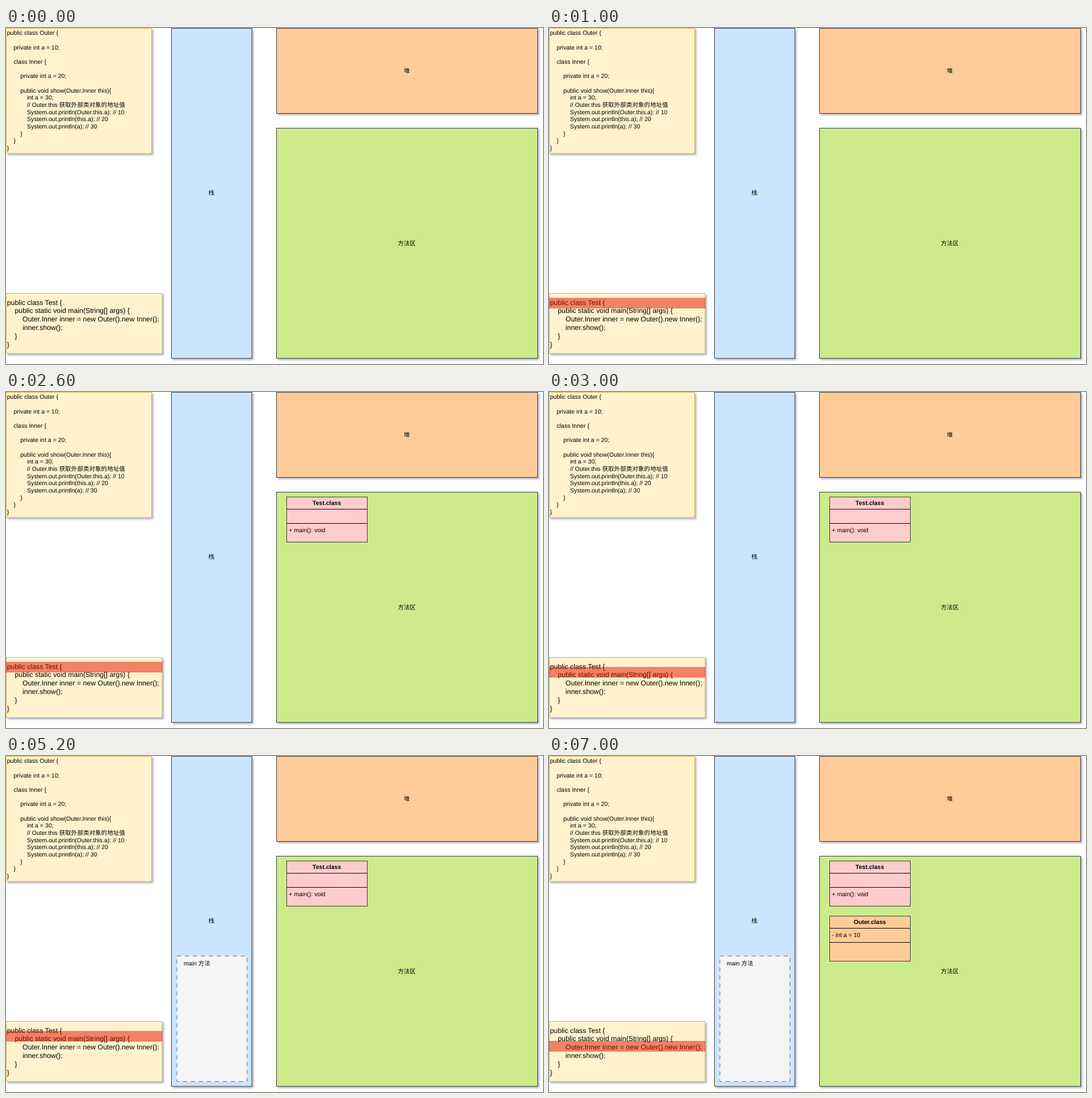
Recreate the animation shown at these times as an HTML page. Size 946 by 592 pixels, loop 8000 ms.

```html
<!DOCTYPE html>
<html lang="zh-CN">
<head>
<meta charset="utf-8">
<style>
  html, body { margin: 0; width: 100%; height: 100%; overflow: hidden; background: #fff; }
  svg { display: block; }
  text {
    font: 10.56px "Liberation Sans", Arial, "Noto Sans CJK SC", sans-serif;
    white-space: pre;
    text-rendering: geometricPrecision;
  }
  .code { font-size: 12.32px; }
  .mid { text-anchor: middle; }
  .bold { font-weight: bold; }
  .box { stroke: #36393d; }
  .note { fill: #fff2cc; stroke: #d6b656; }
  .rule { stroke: #000; }
</style>
</head>
<body>
<svg width="946" height="592" viewBox="0 0 946 592">
  <filter id="shadow" filterUnits="userSpaceOnUse" x="0" y="0" width="946" height="592">
    <feDropShadow dx="2.6" dy="2.6" stdDeviation="1.5" flood-color="#3d4574" flood-opacity=".4"/>
  </filter>
  <g filter="url(#shadow)">
    <rect class="note" x=".5" y=".5" width="256" height="220.5"/>
    <rect class="note" x=".5" y="467.5" width="274.5" height="106"/>
    <rect class="box" x="291.5" y=".5" width="141.5" height="581.5" fill="#cce5ff"/>
    <rect class="box" x="476.5" y=".5" width="460" height="150" fill="#ffcc99"/>
    <rect class="box" x="476.5" y="176.5" width="460" height="405.5" fill="#cdeb8b"/>
  </g>
  <text class="mid" x="361.7" y="294.4">栈</text>
  <text class="mid" x="706" y="78.6">堆</text>
  <text class="mid" x="706" y="382.6">方法区</text>
  <g id="code"></g>
  <g id="frame">
    <rect x="301" y="352.5" width="123.5" height="221" fill="#f5f5f5" stroke="#666" stroke-dasharray="7.04"/>
    <text x="313" y="369.2">main 方法</text>
  </g>
  <g id="classes"></g>
  <rect id="mark" x=".5" width="274.5" height="17.6" fill="#e51400" stroke="#b20000" opacity=".5"/>
</svg>
<script>
const $ = id => document.getElementById(id);

const outerCode = `public class Outer {

    private int a = 10;

    class Inner {

        private int a = 20;

        public void show(Outer.Inner this){
            int a = 30;
            // Outer.this 获取外部类对象的地址值
            System.out.println(Outer.this.a); // 10
            System.out.println(this.a); // 20
            System.out.println(a); // 30
        }
    }
}`;

const testCode = `public class Test {
    public static void main(String[] args) {
        Outer.Inner inner = new Outer().new Inner();
        inner.show();
    }
}`;

const lines = (code, y, step, cls) => code.split('\n')
  .map((s, i) => `<text class="${cls}" x="1.76" y="${y + i * step}">${s}</text>`).join('');

// A class card: title, fields, methods
const card = (id, y, fill, title, field, method) => `<g id="${id}" transform="translate(494.5 ${y})">
  <rect class="box" width="142" height="79.5" fill="${fill}"/>
  <path class="rule" d="M0 21.5H142M0 46.5H142"/>
  <text class="mid bold" x="70.7" y="13.6">${title}</text>
  <text x="3.8" y="37.2">${field}</text>
  <text x="3.8" y="61.9">${method}</text></g>`;

$('code').innerHTML = lines(outerCode, 12.4, 12.67, '') + lines(testCode, 487.6, 14.78, 'code');
$('classes').innerHTML =
  card('test', 185, '#ffcccc', 'Test.class', '', '+ main(): void') +
  card('outer', 282, '#ffcc99', 'Outer.class', '- int a = 10', '');

const starts = { mark: 1, test: 2, frame: 4, outer: 7 };

function draw(now) {
  const t = now / 1000 % 8;
  for (const id in starts) $(id).style.display = t < starts[id] ? 'none' : '';
  $('mark').setAttribute('y', t < 3 ? 476 : t < 6 ? 485 : 502.6);
}

const begin = performance.now();
function tick() {
  draw(performance.now() - begin);
  requestAnimationFrame(tick);
}
tick();
</script>
</body>
</html>
```
